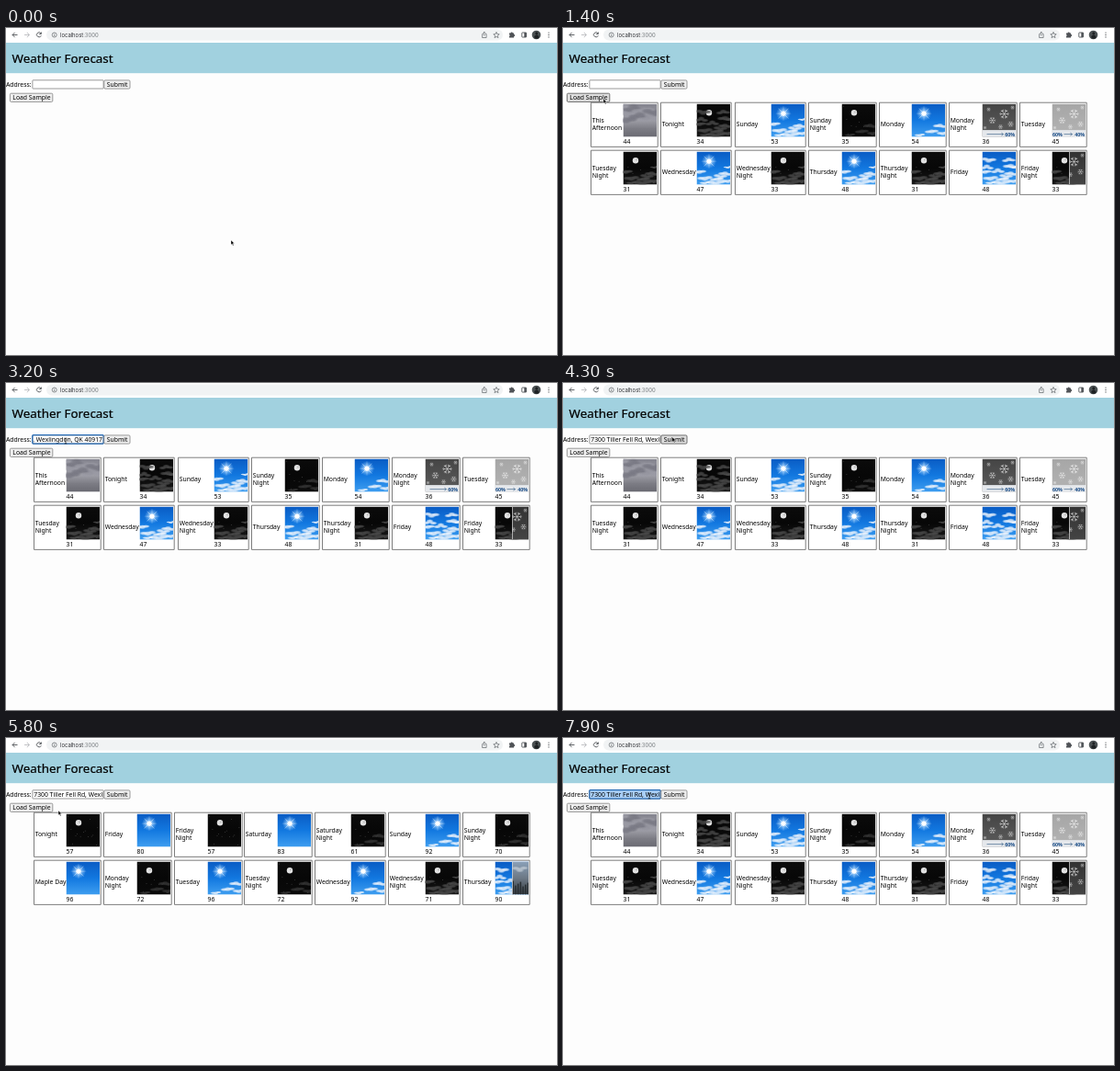
An HTML page with a canvas for the animation above (8 s loop, 600 by 356 pixels).

```html
<!DOCTYPE html>
<html lang="en">
<head>
<meta charset="utf-8">
<title>Weather Forecast</title>
<style>
html, body { margin: 0; width: 100%; height: 100%; overflow: hidden; background: #fdfdfd; }
canvas { display: block; width: 600px; height: 356px; }
</style>
</head>
<body>
<canvas id="stage"></canvas>
<script>
const LOOP = 8000, STEP = 100;
const canvas = document.getElementById('stage');
const ratio = window.devicePixelRatio || 1;
canvas.width = 600 * ratio;
canvas.height = 356 * ratio;
const c = canvas.getContext('2d');
const SANS = '"Noto Sans", "Open Sans", sans-serif';
const ADDRESS = '7300 Tiller Fell Rd, Wexlingdon, QK 40917';
const ADDRESS_END = ', Wexlingdon, QK 40917';

// label (with / as line break) | temperature | picture
const sample = {
  right: [103, 183, 264, 341, 417, 494, 570],
  left: [30, 106, 187, 267, 344, 420, 497],
  cards: `This/Afternoon|44|rain,Tonight|34|night3,Sunday|53|day2,Sunday/Night|35|night1,Monday|54|day1,Monday/Night|36|snowDark,Tuesday|45|snowLight,
Tuesday/Night|31|night2,Wednesday|47|day2,Wednesday/Night|33|night2,Thursday|48|day2,Thursday/Night|31|night2,Friday|48|day3,Friday/Night|33|night2+flakes`
};
const forecast = {
  right: [103, 180, 257, 333, 413, 494, 570],
  left: [30, 106, 183, 259, 336, 416, 497],
  cards: `Tonight|57|night0,Friday|80|day0,Friday/Night|57|night0,Saturday|83|day0,Saturday/Night|61|night1,Sunday|92|day1,Sunday/Night|70|night1,
Maple Day|96|day0,Monday/Night|72|night1,Tuesday|96|day1,Tuesday/Night|72|night1,Wednesday|92|day1,Wednesday/Night|71|night2,Thursday|90|day3+rain`
};

// time, x, y of the pointer tip
const path = [[0, 245, 231], [200, 144, 92], [300, 144, 92], [1200, 44, 77], [1700, 44, 77], [2600, 65, 63],
  [3500, 65, 63], [4000, 119, 59], [4700, 119, 59], [5600, 58, 79], [5800, 57, 79], [6400, 41, 76], [6700, 41, 76],
  [7500, 94, 63], [8000, 94, 63]];

function text(str, x, y, size = 6.8, color = '#000', family = SANS, weight = 400) {
  c.font = `${weight} ${size}px ${family}`;
  c.fillStyle = color;
  c.fillText(str, x, y);
}
function rect(x, y, w, h, color) {
  c.fillStyle = color;
  c.fillRect(x, y, w, h);
}
function box(x, y, w, h, r, fill, stroke, line = 1) {
  c.beginPath();
  c.roundRect(x, y, w, h, r);
  if (fill) { c.fillStyle = fill; c.fill(); }
  if (stroke) { c.strokeStyle = stroke; c.lineWidth = line; c.stroke(); }
}
function shape(d, stroke, fill, line = 1) {
  const p = new Path2D(d);
  if (fill) { c.fillStyle = fill; c.fill(p); }
  if (stroke) { c.strokeStyle = stroke; c.lineWidth = line; c.stroke(p); }
}
function disc(x, y, rx, ry, color) {
  c.fillStyle = color;
  c.beginPath();
  c.ellipse(x, y, rx, ry, 0, 0, 7);
  c.fill();
}
function gradient(...colors) {
  const g = c.createLinearGradient(0, 0, 0, 36);
  colors.forEach((color, i) => g.addColorStop(i / (colors.length - 1), color));
  rect(0, 0, 37, 36, g);
}
// soft-edged ellipse
function puff(x, y, rx, ry, rgb, alpha) {
  const g = c.createRadialGradient(0, 0, 0, 0, 0, 1);
  g.addColorStop(0, `rgba(${rgb},${alpha})`);
  g.addColorStop(0.5, `rgba(${rgb},${alpha * 0.85})`);
  g.addColorStop(1, `rgba(${rgb},0)`);
  c.save();
  c.translate(x, y);
  c.scale(rx, ry);
  disc(0, 0, 1, 1, g);
  c.restore();
}

function sun(x, y) {
  puff(x, y, 8, 8, '150,205,255', 0.7);
  c.beginPath();
  for (let i = 0; i < 32; i++) {
    const r = i % 2 ? 1.7 : i % 4 ? 4.5 : 9;
    c.lineTo(x + r * Math.cos(i * Math.PI / 16), y + r * Math.sin(i * Math.PI / 16));
  }
  c.fillStyle = '#eaf5ff';
  c.fill();
  disc(x, y, 2.6, 2.6, '#fff');
}
function cloud(x, y, w, rgb) {
  for (let i = -1; i < 2; i++)
    puff(x + i * w * 0.5, y + Math.sin(i * 2.7 + x) * w * 0.12, w * 0.55, w * (0.32 - Math.abs(i) * 0.08), rgb, 0.85);
}
const clouds = [
  [[31, 24, 8], [22, 30, 8], [34, 32, 7], [9, 34, 6]],
  [[3, 22, 8], [9, 29, 9], [26, 27, 8], [34, 17, 5], [21, 34, 11]],
  [[7, 9, 9], [29, 9, 8], [5, 17, 8], [31, 16, 9], [17, 21, 8]]
];
function sky(night, level) {
  if (night) gradient('#0b0b0b', '#070707', level > 1 ? '#191919' : '#0a0a0a');
  else gradient('#0a5cc4', '#1278e0', '#3f9ef0');
  if (night) {
    for (let i = 0; i < 16 - level * 4; i++) rect((i * 13.7) % 36, (i * i * 5.3 + 3) % 34, 0.6, 0.6, '#777');
    disc(13.5, 9.7, 3.2, 3.3, '#e2e2e2');
    disc(14.4, 9, 0.9, 1, '#bbb');
  } else if (level < 3) sun(13.5, 10.5);
  for (const group of clouds.slice(0, level))
    for (const [x, y, w] of group) cloud(x, y, w, night ? (level > 1 ? '74,74,74' : '52,52,52') : '240,245,252');
}
function rain() {
  gradient('#85858f', '#8e8e98', '#9d9da5', '#7c7c84', '#6a6a72');
  for (let i = 0; i < 8; i++) cloud((i * 11) % 37, 3 + i * 2.1, 13, i % 2 ? '118,118,129' : '154,154,164');
}
function flake(x, y, r) {
  c.strokeStyle = `rgba(255,255,255,${0.15 + r * 0.09})`;
  c.lineWidth = 0.7;
  for (let k = 0; k < 6; k++) {
    c.save();
    c.translate(x, y);
    c.rotate(k * Math.PI / 3);
    c.beginPath();
    c.moveTo(0, 0); c.lineTo(r, 0);
    c.moveTo(r * 0.9, -r * 0.3); c.lineTo(r * 0.6, 0); c.lineTo(r * 0.9, r * 0.3);
    c.stroke();
    c.restore();
  }
}
function snow(top, bottom) {
  gradient(top, bottom);
  [[24, 11, 5.2], [11, 18, 3.6], [31, 22, 3], [7, 6, 2], [20, 25, 2.4], [33, 4, 2], [3, 26, 1.6]].forEach(f => flake(...f));
}
function chance(from, to) {
  rect(0, 28.5, 37, 8, '#e5e8ec');
  const start = from ? 13 : 5, end = from ? 22 : 23;
  if (from) text(from, 0.5, 35, 5.3, '#174a85', SANS, 700);
  text(to, 24.8, 35, 5.3, '#174a85', SANS, 700);
  shape(`M${start} 33H${end}M${end - 2} 31.5L${end} 33L${end - 2} 34.5`, '#45698f', null, 0.7);
}
function picture(kind) {
  if (kind.includes('+')) {
    const [a, b] = kind.split('+');
    picture(a);
    c.save();
    c.beginPath();
    c.rect(18.5, 0, 18.5, 36);
    c.clip();
    if (b == 'rain') {
      gradient('#8aa0b8', '#6c7885', '#343b40');
      cloud(27, 8, 9, '190,200,210');
      for (let i = 0; i < 7; i++) rect(19 + i * 2.7, 21 + (i * 5) % 7, 1.5, 15, '#282e32');
    } else snow('#333', '#444');
    rect(18, 0, 1.2, 36, '#ddd');
    c.restore();
  } else if (kind == 'rain') rain();
  else if (kind == 'snowDark') { snow('#454545', '#5c5c5c'); chance('', '60%'); }
  else if (kind == 'snowLight') { snow('#a6a6a6', '#b4b4b4'); chance('60%', '40%'); }
  else sky(kind.startsWith('night'), +kind.slice(-1));
}

function drawCards({ left, right, cards }) {
  cards.split(',').forEach((entry, i) => {
    const [label, degrees, kind] = entry.trim().split('|');
    const col = i % 7, y = i < 7 ? 80.7 : 132.7, x = left[col], px = right[col] - 37.5;
    box(x + 0.5, y + 0.5, right[col] - x - 0.3, 48.2, 0, '#fff', '#707070', 0.9);
    const lines = label.split('/');
    lines.forEach((line, k) => text(line, x + 1.7, y + (lines.length > 1 ? 22.4 + k * 8 : 26.6)));
    text(degrees, px, y + 45.7);
    c.save();
    c.translate(px, y + 1.9);
    c.beginPath();
    c.rect(0, 0, 36.5, 36);
    c.clip();
    picture(kind);
    c.restore();
  });
}

function toolbar() {
  rect(0, 0, 600, 16, '#fff');
  box(44, 1.5, 497, 12, 6, '#f1f3f4');
  const arrow = 'M12.5 7.5H7M9.6 4.9L7 7.5L9.6 10.1';
  shape(arrow, '#505357', null, 0.9);
  c.save();
  c.translate(32.5, 0);
  c.scale(-1, 1);
  shape(arrow, '#bbbdc0', null, 0.9);
  c.restore();
  shape('M38 5.8A2.5 2.5 0 1 0 38.3 8.3M38.4 4.5V6.6H36.2', '#505357', null, 0.9);
  shape('M55.2 7.5a2.5 2.5 0 1 1-5 0a2.5 2.5 0 1 1 5 0M52.7 7V9M52.7 5.7V6.4', '#5f6368', null, 0.7);
  text('localhost', 59, 9.7, 5.9, '#303236', 'Inter, sans-serif');
  text(':3000', 59 + c.measureText('localhost').width, 9.7, 5.9, '#75797d', 'Inter, sans-serif');
  shape('M519.7 6.6H518.6V10.5H523.1V6.6H522M520.8 8.6V4.3M519.4 5.6L520.8 4.2L522.2 5.6', '#5f6368', null, 0.7);
  shape('M534 4.4L534.9 6.6L537.2 6.8L535.4 8.3L536 10.6L534 9.4L532 10.6L532.6 8.3L530.8 6.8L533.1 6.6Z', '#5f6368', null, 0.7);
  shape('M548 5.6H549.6A1.1 1.1 0 0 1 551.8 5.6H553.1V7A1.1 1.1 0 0 1 553.1 9.2V10.5H548V9A1.1 1.1 0 0 0 548 7Z', null, '#505357');
  box(561.8, 5, 4.8, 5, 0.5, null, '#505357', 0.9);
  rect(564.3, 5, 2.3, 5, '#505357');
  disc(577.5, 7.5, 4.8, 4.8, '#4b5153');
  disc(577.8, 6, 1.5, 1.8, '#1e2224');
  disc(577.8, 9.7, 2.6, 2, '#1e2224');
  for (const y of [5.1, 7.5, 9.9]) disc(591, y, 0.65, 0.65, '#505357');
}

function button(label, x, y, w, h, mouse) {
  const hover = mouse.x >= x && mouse.x <= x + w && mouse.y >= y && mouse.y <= y + h;
  box(x + 0.4, y + 0.4, w - 0.8, h - 0.8, 1.2, hover ? '#dedede' : '#efefef', hover ? '#4f4f4f' : '#808080', 0.8);
  text(label, x + 3.3, y + 7.2, 6.85);
}

function addressField(t) {
  const focused = (t >= 2700 && t < 4200) || t >= 7700;
  text('Address:', 0, 63.8);
  box(28.9, 56.8, 77.2, 9.2, 0.5, '#fff', '#808080', 0.8);
  c.save();
  c.beginPath();
  c.rect(30, 57, 75.4, 9);
  c.clip();
  if (t >= 7700) rect(30, 57.2, 75.4, 8.5, '#a9cff7');
  if (t >= 4200) text(ADDRESS, 30.3, 63.7);
  else if (t >= 3000) {
    c.textAlign = 'right';
    text(ADDRESS_END, 105, 63.7);
    c.textAlign = 'left';
  }
  c.restore();
  if (focused) box(28.8, 56.6, 77.4, 9.5, 1, null, '#2369b5', 1.3);
}

function pointerAt(t) {
  const i = path.findIndex(p => p[0] > t);
  const [t0, x0, y0] = path[i - 1], [t1, x1, y1] = path[i];
  const u = (t - t0) / (t1 - t0), e = u * (2 - u);
  return { x: x0 + (x1 - x0) * e, y: y0 + (y1 - y0) * e };
}
function drawPointer({ x, y }) {
  const overField = x > 29 && x < 106 && y > 57 && y < 66.5;
  c.save();
  c.translate(x, y);
  if (overField) shape('M-1.3 -3.2Q0 -3.2 0 -2.4Q0 -3.2 1.3 -3.2M0 -2.6V2.6M-1.3 3.2Q0 3.2 0 2.4Q0 3.2 1.3 3.2', '#222', null, 0.7);
  else shape('M0 0V5L1.2 3.9L2.1 6L3 5.6L2.1 3.6H3.7Z', '#fff', '#000', 0.4);
  c.restore();
}

function draw(t) {
  c.setTransform(ratio, 0, 0, ratio, 0, 0);
  rect(0, 0, 600, 356, '#fdfdfd');
  toolbar();
  rect(0, 16, 600, 33.2, '#a1d1df');
  text('Weather Forecast', 6.6, 38.4, 13.4);
  c.strokeStyle = '#000';
  c.lineWidth = 0.2;
  c.strokeText('Weather Forecast', 6.6, 38.4);
  const mouse = pointerAt(t);
  addressField(t);
  button('Submit', 106.4, 56.5, 29, 10, mouse);
  button('Load Sample', 4, 70.8, 47.2, 10, mouse);
  if (t >= 1400) drawCards(t >= 4800 && t < 6500 ? forecast : sample);
  drawPointer(mouse);
}

function frame() {
  draw(Math.floor(performance.now() % LOOP / STEP) * STEP);
  requestAnimationFrame(frame);
}
frame();
</script>
</body>
</html>
```
